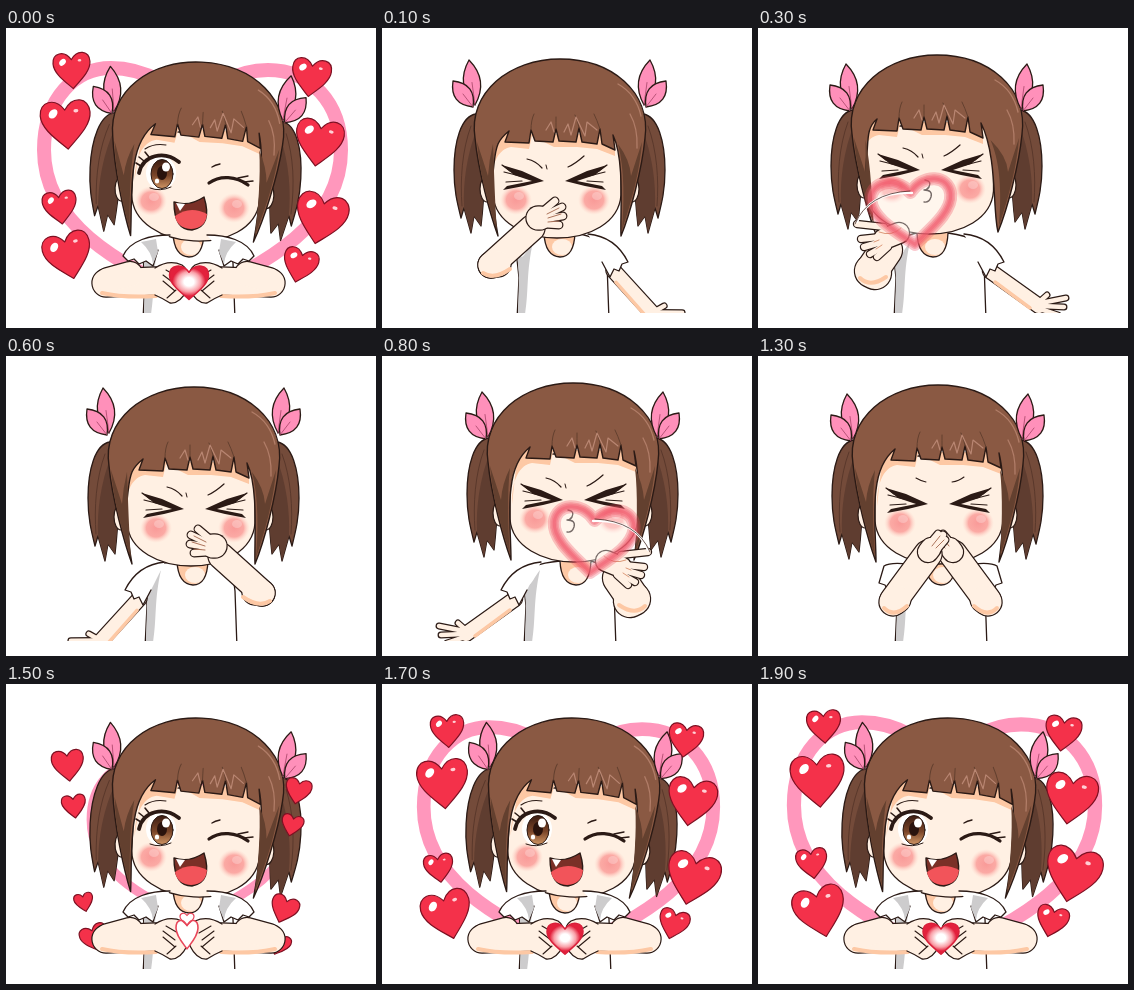
An HTML page for the animation above (2000 ms loop, 370x300 px).

```html
<!DOCTYPE html>
<html lang="en">
<head>
<meta charset="utf-8">
<title>Blowing kisses</title>
<style>
html, body { margin: 0; width: 100%; height: 100%; overflow: hidden; background: #fff; }
svg { display: block; width: 100%; height: 100%; }
</style>
</head>
<body>
<svg viewBox="0 0 370 300" stroke-linejoin="round" stroke-linecap="round">
  <defs>
    <clipPath id="floor"><rect width="370" height="285"/></clipPath>
    <radialGradient id="blush">
      <stop offset="0" stop-color="#f99a98"/><stop offset=".6" stop-color="#fba6a1" stop-opacity=".95"/>
      <stop offset="1" stop-color="#ffd9cc" stop-opacity="0"/>
    </radialGradient>
    <radialGradient id="spark" cy=".47">
      <stop offset=".25" stop-color="#fff"/><stop offset=".6" stop-color="#f9a0a8"/><stop offset=".85" stop-color="#e3203c"/>
    </radialGradient>
    <linearGradient id="iris" x2="0" y2="1">
      <stop offset="0" stop-color="#3a1c12"/><stop offset=".55" stop-color="#7a4529"/><stop offset="1" stop-color="#cf9564"/>
    </linearGradient>
  </defs>
  <g id="stage" clip-path="url(#floor)"></g>
</svg>
<script>
const INK = '#2b1a15', SKIN = '#fff0e3', SHADE = '#fdc8a4', HAIR = '#8a5943', DARK = '#63402f',
      PINK = '#ff90ba', RED = '#f4314a', GRAY = '#cdcccd';
const STEP = 100, COUNT = 20;
const stage = document.getElementById('stage');

const shape = (d, fill, w = 1.3, ink = INK) => `<path d="${d}" fill="${fill}" stroke="${ink}" stroke-width="${w}"/>`;
const fillOnly = (d, fill) => `<path d="${d}" fill="${fill}"/>`;
const line = (d, w = 1.2, ink = INK) => shape(d, 'none', w, ink);
const oval = (x, y, rx, ry, fill, extra = '') => `<ellipse cx="${x}" cy="${y}" rx="${rx}" ry="${ry}" fill="${fill}" ${extra}/>`;
const group = (t, s) => `<g transform="${t}">${s}</g>`;
const move = (x, y, s) => group(`translate(${x} ${y})`, s);
const mirror = (sum, s) => group(`matrix(-1 0 0 1 ${sum} 0)`, s);
const mix = (a, b, k) => a + (b - a) * k;

// Rounded limbs: all outlines first, then all skin, so joints merge.
const limbs = (...parts) =>
  parts.map(([d, w]) => line(d, w + 2.4)).join('') + parts.map(([d, w]) => line(d, w, SKIN)).join('');

const HEART = 'M0,.45C-.2,.27 -.5,.06 -.5,-.18C-.5,-.44 -.18,-.5 0,-.25C.18,-.5 .5,-.44 .5,-.18C.5,.06 .2,.27 0,.45Z';
const heart = (x, y, w, tilt, attrs, extra = '', tall = 1) =>
  group(`translate(${x} ${y}) rotate(${tilt}) scale(${w} ${w * tall})`,
    `<path d="${HEART}" ${attrs} vector-effect="non-scaling-stroke"/>${extra}`);

function leaf(x0, y0, x1, y1, w) {
  const dx = x1 - x0, dy = y1 - y0, n = w / Math.hypot(dx, dy);
  const px = -dy * n, py = dx * n, mx = x0 + dx * .5, my = y0 + dy * .5;
  return shape(`M${x0},${y0}Q${mx + px},${my + py} ${x1},${y1}Q${mx - px},${my - py} ${x0},${y0}Z`, PINK) +
    line(`M${x0},${y0}L${mx},${my}`, .8, '#a84468');
}

// ---------- head ----------
const tail =
  shape('M96,84C81,86 74,112 74,140C74,160 77,172 81,188L84,178L91,203L94,186L101,196C104,170 107,120 104,92Z', '#744b3a') +
  fillOnly('M98,96C86,125 83,155 84,178L91,203L94,186L101,196C104,170 106,120 104,92Z', '#5f3d30') +
  line('M91,96C82,120 80,150 82,176', 1, '#5a382b');
const bow = leaf(95, 83, 89, 38, 17) + leaf(93, 85, 73, 59, 17);
const ear = oval(107, 159, 7, 13, SKIN, `stroke="${INK}" stroke-width="1.2"`) + line('M104,153Q109,158 106,166', 1, '#e39b78');
const both = s => s + mirror(359, s);

// turn slides the fringe sideways, nod lowers it and lifts the bows.
function skull(turn = 0, nod = 0) {
  const e = turn / 2;
  const at = (x, y) => `${x + turn},${y + nod}`;
  const fringe = [[230, 106], [228, 91], [225, 106], [210, 104], [207, 90], [204, 104], [187, 103], [184, 91],
    [181, 104], [163, 103], [159, 92], [157, 105], [133, 104]].map(p => at(...p)).join('L');
  const cap = 'M118,206C110,184 98,140 95,108C88,62 130,29 180,29C232,29 271,62 265,108C262,140 250,184 241,206' +
    `C${244 + e},185 ${249 + e},130 ${at(241, 97)}L${at(243, 112)}L${fringe}L${at(137, 93)}` +
    `C${at(126, 102)} ${120 + e},115 ${118 + e},134C${115 + e},155 ${118 + e},184 118,206Z`;
  const lock = (side, inner) => fillOnly(
    `M${side},112C${mix(side, inner, .1)},140 ${mix(side, inner, .5)},170 ${inner},200C${mix(side, inner, .9)},175 ${mix(side, inner, .85)},140 ${inner + e},114Q${mix(side, inner, .6)},130 ${mix(side, inner, .55)},146Z`, DARK);
  return both(tail) + both(ear) +
    move(e, 0, shape('M117,100L117,165C119,193 150,208 181,208C213,208 243,193 245,165L245,100Z', SKIN)) +
    move(turn, nod, fillOnly('M119,150C119,124 127,111 139,109L157,111L160,98L182,109L205,109L225,111L243,118L243,96L125,96Z', SHADE)) +
    shape(cap, HAIR, 1.4) + lock(97, 117) + lock(262, 242) +
    move(turn, nod,
      line('M159,92Q159,82 162,76M184,91Q184,84 184,79M207,90Q206,82 203,77M228,91Q225,82 222,76', 1, DARK) +
      line('M174,92L179,84L182,94M192,94L196,86L199,97L204,79L213,98L215,84L225,92', 1.2, '#b98672')) +
    line('M238,54Q256,64 261,86M250,84Q258,98 257,118', 1.3, '#b17d68') +
    move(0, -nod, both(bow));
}

const blush = (x, y) => oval(x, y, 16, 15, 'url(#blush)') + oval(x + 3, y - 4, 5, 4, '#fff', 'opacity=".25"');
const squeeze = fillOnly('M128,134L148,140L170,150L150,155L129,159L133,155L158,150L140,144Z', INK) +
  line('M130,141L146,145M132,151L148,150M128,134L136,140', 1.2);

const mouths = {
  none: '',
  kiss: line('M175,160Q182,161 179,167Q177,170 174,170Q183,170 181,177Q179,183 174,182', 1.4),
  open: shape('M169,170Q184,162 201,169L201,180Q200,197 185,197Q171,196 170,180Z', '#8a4a38', 1.4) +
    fillOnly('M171,183Q185,174 200,182Q199,196 185,196Q172,195 171,183Z', '#f5605f')
};

function squintFace(mouth, fierce) {
  const brow = fierce ? line('M153,128Q162,130 168,137M194,136Q201,133 210,125', 1.2) + line('M172,134L173,138', 1)
                      : line('M158,124Q163,127 168,128M194,128Q201,127 206,123', 1.1);
  return blush(142, 169) + blush(220, 169) + brow + squeeze + mirror(361, squeeze) + mouths[mouth];
}

const winkHead = group('translate(11 5) rotate(3 180 120)', skull()) +
  blush(145, 173) + blush(228, 180) +
  oval(155, 145, 15, 17, '#fff') +
  oval(156, 146, 11, 14.5, 'url(#iris)', `stroke="${INK}"`) + oval(156, 145, 5, 7, '#2a130d') +
  oval(160, 139, 4, 4.5, '#fff') + oval(151, 153, 2.2, 2.6, '#fff') +
  line('M133,145C137,127 158,122 173,134', 3.8) + line('M135,138L130,135M138,133L133,129M143,129L139,124', 1.6) +
  line('M144,160Q154,164 165,159', 1) + line('M139,121Q148,115 160,117', 1.1) +
  line('M203,155C214,147 230,148 242,157', 3.2) + line('M232,150L242,148M238,154L247,153M206,139Q209,137 214,136', 1.4) +
  shape('M168,174Q183,179 198,169Q207,198 186,202Q168,202 168,174Z', '#7a3027', 1.4) +
  fillOnly('M169,188Q184,177 201,186Q200,200 185,201Q171,200 169,188Z', '#f2545a') +
  fillOnly('M170,175L174,183L179,176Z', '#fff');

// ---------- body ----------
const torso = (neck, dx = 0) => oval(neck, 212, 16, 16, SHADE) + oval(neck + 2, 219, 10, 8, SKIN) +
  move(dx, 0,
    shape(`M${neck - 16 - dx},205C150,207 140,212 136,222L139,250L137,292H229L227,235C226,215 215,208 ${neck + 15 - dx},205Q${neck + 14 - dx},229 ${neck - dx},229Q${neck - 15 - dx},228 ${neck - 16 - dx},205Z`, '#fff') +
    fillOnly('M137,222C142,238 146,222 153,214C146,245 149,262 145,286H138L139,250Z', GRAY));
const openSleeve = shape('M206,206C228,208 240,222 246,234L240,236L237,243L232,241L228,249L220,234', '#fff');
const reach = swing => group(`rotate(${swing} 234 240)`,
  limbs(['M232,243L281,278', 14], ['M283,275L308,270', 4.5], ['M284,278L306,279', 4.5], ['M282,281L300,287', 4.5], ['M280,275L289,267', 4.5]) +
  line('M237,254L272,280', 3.5, SHADE)) + openSleeve;

const blowArm = limbs(['M115,241L128,222', 32], ['M113,243L117,245', 32]) +
  line('M102,250Q112,260 128,249', 4, SHADE) +
  limbs(['M126,211L141,205', 20], ['M126,199L99,196', 6], ['M122,209L103,211', 6], ['M123,214L106,219', 6],
        ['M126,218L112,226', 6], ['M130,219L119,229', 6]) +
  line('M121,204Q134,209 143,200M121,212L116,214M124,217L118,221', .9, '#d88f6c');
const mouthArm = limbs(['M109,237L150,200', 25], ['M109,237L116,236', 25]) +
  line('M101,245Q112,252 128,241', 4, SHADE) +
  limbs(['M156,190L158,190', 23], ['M160,184L173,173', 6.5], ['M163,187L180,179', 6.5], ['M163,191L181,188', 6.5], ['M162,196L177,197', 6.5]) +
  line('M165,186L177,180M166,190L179,186M166,194L177,193', .9, '#a3664c');

function sidePose(toRight, arm, neck, swing, dx) {
  const wrap = s => toRight ? mirror(365, s) : s;
  return { back: torso(neck, dx) + wrap(reach(swing)), front: wrap(arm) };
}
const mouthLeft = sidePose(false, mouthArm, 178, 12, -2), mouthRight = sidePose(true, mouthArm, 187, 12, 2);
const blowLeft = sidePose(false, blowArm, 175, 0, -1), blowRight = sidePose(true, blowArm, 194, 0, 5);

const praySide = shape('M150,208Q132,206 126,210L121,227L127,229L130,235L142,230', '#fff') +
  limbs(['M136,244L170,198', 27], ['M135,246L139,243', 27]) + line('M126,252Q136,262 149,250', 4, SHADE) +
  limbs(['M170,196L173,192', 20], ['M170,190L180,178', 6.5], ['M173,193L185,179', 6.5], ['M177,196L187,184', 6.5]) +
  line('M174,190L182,180M178,192L186,184', .9, '#a3664c');
const pray = { back: torso(183), front: mirror(365, praySide) + praySide };

const cuddleSide = shape('M164,207C145,207 124,212 117,228L122,233L128,231L133,236L140,233L147,238L152,222', '#fff') +
  fillOnly('M135,214Q146,224 147,236L152,224L150,211Z', GRAY) +
  limbs(['M100,255L150,253', 27], ['M102,252L124,246', 24]) + line('M96,265Q118,270 150,268', 4, SHADE) +
  shape('M149,240Q163,231 176,237Q183,242 180,248L181,262Q174,276 164,275Q156,270 149,267', SKIN) +
  line('M160,242L172,249M157,247L169,256M157,253L169,263M161,270L170,262', 1.1);
const cuddle = { back: torso(183), front: cuddleSide + mirror(365, cuddleSide) };

// ---------- hearts ----------
// start x, y, width, then end x, y, width, tilt
const flock = [
  [62, 81, 32, 66, 42, 37, -4], [68, 122, 24, 60, 96, 50, -5], [78, 218, 19, 54, 179, 34, -8], [89, 254, 28, 62, 227, 48, -14],
  [292, 107, 26, 305, 49, 39, 8], [286, 141, 22, 313, 114, 48, 9], [278, 225, 28, 315, 190, 52, 13], [273, 260, 22, 294, 237, 35, 15]
];
const gloss = oval(-.24, -.2, .1, .07, '#fff', 'transform="rotate(-35 -.24 -.2)"') + oval(.22, -.22, .05, .03, '#ffd0d5');

const ring = size => group(`translate(186 165) scale(${size}) translate(-186 -165)`,
  line('M186,270C110,235 38,195 38,122C38,70 70,40 105,40C140,40 170,60 186,80C202,60 230,42 262,42C305,42 335,75 335,122C335,195 262,235 186,270Z', 14, '#ff97bc'));

const flyers = (k, pulse) => flock.map(([x0, y0, w0, x1, y1, w1, tilt]) => {
  const beat = pulse ? (w1 > 45 ? 4 : -3) : 0;
  return heart(mix(x0, x1, k), mix(y0, y1, k), mix(w0, w1, k) + beat, mix(tilt * 1.6, tilt, k),
    `fill="${RED}" stroke="#7d1022" stroke-width="1.2"`, k > .3 ? gloss : '', 1.12);
}).join('');

// A clear heart whose red rim softens inwards, drawn as stacked strokes.
const rimHeart = (x, y, w, tilt, tall) =>
  heart(x, y, w, tilt, 'fill="#fff" opacity=".35"', '', tall) +
  [13, 9, 6, 3].map(s => heart(x, y, w - 6, tilt, `fill="none" stroke="#ee4a5c" stroke-opacity=".3" stroke-width="${s}"`, '', tall)).join('');

function kissHeart(age, toRight) {
  if (age < 0 || age > 3) return '';
  const x = [136, 154, 153, 154][age], y = [196, 183, 175, 172][age], w = [44, 86, 128, 165][age];
  const art = age === 3
    ? [22, 14].map(s => heart(x, y, w - 14, 12, `fill="none" stroke="#ffb4b4" stroke-opacity=".16" stroke-width="${s}"`, '', 1.05)).join('')
    : `<g opacity="${age === 2 ? .55 : 1}">${rimHeart(x, y, w, -5, .93)}</g>` +
      (age === 1 ? line('M99,194Q112,163 154,165', 2.4, '#fff') + line('M97,196Q110,165 152,163', .8, '#4a2d28') : '');
  return toRight ? mirror(365, art) : art;
}

// ---------- scenes ----------
const squintScene = (body, head, hair, face, mouth, fierce, extra = '') =>
  body.back + move(...head, skull(...hair)) + move(...face, squintFace(mouth, fierce)) + body.front + extra;

function winkScene(k, pulse) {
  const small = k < .2;
  const middle = small
    ? heart(181, 250, 22, 0, 'fill="#fff" stroke="#e8465a" stroke-width="1.6"', '', 1.5) +
      heart(181, 235, 14, 0, 'fill="none" stroke="#e8465a" stroke-width="1.2"')
    : heart(183, 254, pulse ? 36 : 39, 0, 'fill="url(#spark)" stroke="#d91f3a" stroke-width="1.5"');
  return ring(mix(.68, 1, k) * (pulse ? 1.014 : 1)) + cuddle.back + winkHead + flyers(k, pulse) + cuddle.front + middle;
}

function scene(i) {
  if (i === 0) return winkScene(1, false);
  if (i === 1) return squintScene(mouthLeft, [-2, 2], [-8, 8], [-8, 3], 'none', true);
  if (i < 6) return squintScene(blowLeft, [-1, -2], [-17, 0], [-8, -8],
    i < 5 ? 'kiss' : 'open', true, kissHeart(i - 2, false));
  if (i === 6) return squintScene(mouthRight, [8, 2], [-8, 8], [8, 3], 'none', true);
  if (i < 13) return squintScene(blowRight, [11, -2], [0, 0], [11, -6],
    i < 10 ? 'kiss' : 'open', true, kissHeart(i - 7, true));
  if (i < 15) return squintScene(pray, [0, i - 13], [0, 0], [0, i - 15], 'none', false);
  return winkScene([0, .55, .88, 1, 1][i - 15], i === 17 || i === 19);
}

let shown = -1;
function draw(now) {
  const i = Math.floor(now / STEP) % COUNT;
  if (i !== shown) stage.innerHTML = scene(shown = i);
}
const begin = performance.now();
function tick() {
  draw(performance.now() - begin);
  requestAnimationFrame(tick);
}
tick();
</script>
</body>
</html>
```
